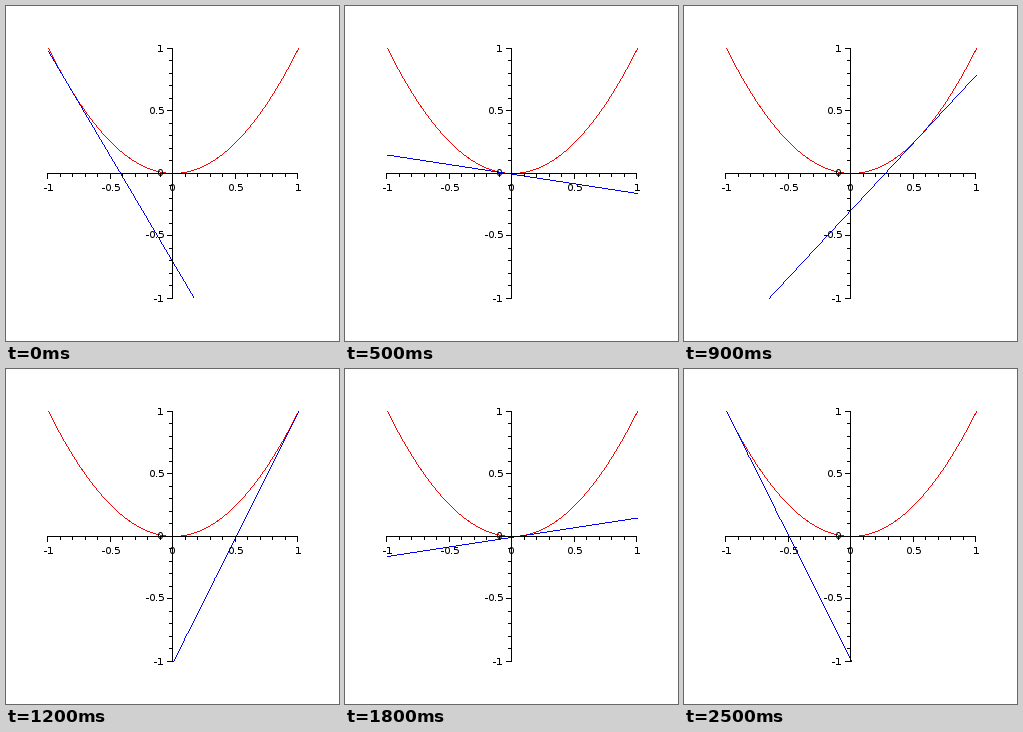
A matplotlib script for the animation above (2600 ms loop, 333x335 px).

```python
import matplotlib.pyplot as plt
import numpy as np
from matplotlib.animation import FuncAnimation

WIDTH, HEIGHT, DPI = 333, 335, 100
CX, CY, UNIT = 166.5, 167.5, 125
HALF_CYCLE = 13
PX = 72 / DPI

plt.rcParams.update({
    "font.family": "DejaVu Sans",
    "text.hinting": "default",
    "text.hinting_factor": 1,
})

fig = plt.figure(figsize=(WIDTH / DPI, HEIGHT / DPI), dpi=DPI, facecolor="white")
ax = fig.add_axes([0, 0, 1, 1])
ax.set(xlim=(0, WIDTH), ylim=(HEIGHT, 0))
ax.axis("off")


def to_px(x, y):
    return CX + UNIT * x, CY - UNIT * y


def rule(x0, y0, x1, y1):
    ax.plot([x0, x1], [y0, y1], color="black", lw=PX, snap=False,
            solid_capstyle="butt", zorder=4)


def label(x, y, value, ha):
    ax.text(x, y, f"{value:g}", fontsize=10 * PX, ha=ha, va="center", zorder=5)


def draw_axes():
    reach = UNIT + 0.5
    rule(CX - reach, CY, CX + reach, CY)
    rule(CX, CY - reach, CX, CY + reach)
    for k in range(-10, 11):
        # Tick positions fall on whole pixels.
        offset = np.floor(UNIT * k / 10 + 0.5)
        x, y = CX + offset, CY - offset
        length = 5.5 if k % 5 == 0 else 3.5
        rule(x, CY, x, CY + length)
        rule(CX - length, y, CX, y)
        if k % 5 == 0:
            label(x, CY + 14.5, k / 10, "center")
            label(CX - 9, y, k / 10, "right")


def trace(x, y):
    """Pixels of a one-pixel-wide curve: one per column, or per row where steep."""
    px, py = to_px(x, y)
    steep = np.abs(np.gradient(py)) > np.abs(np.gradient(px))
    major = np.where(steep, py, px)
    keep = np.abs(major % 1 - 0.5) < 0.03
    return np.floor(px[keep]) + 0.5, np.floor(py[keep]) + 0.5


def pixel_curve(color, zorder):
    return ax.plot([], [], ",", color=color, zorder=zorder)[0]


def tangent(a):
    """Tangent to y = x^2 at a, clipped to the square [-1, 1]."""
    x = np.linspace(-1, 1, 12001)
    y = 2 * a * x - a * a
    inside = np.abs(y) <= 1 + 1e-9
    return x[inside], y[inside]


draw_axes()
xs = np.linspace(-1, 1, 12001)
pixel_curve("red", 2).set_data(*trace(xs, xs ** 2))
line = pixel_curve("blue", 3)


def update(i):
    k = HALF_CYCLE - abs(i + 1 - HALF_CYCLE)
    line.set_data(*trace(*tangent(2 * k / HALF_CYCLE - 1)))
    return (line,)


anim = FuncAnimation(fig, update, frames=2 * HALF_CYCLE, interval=100,
                     repeat=True, repeat_delay=0)
plt.show()
```
